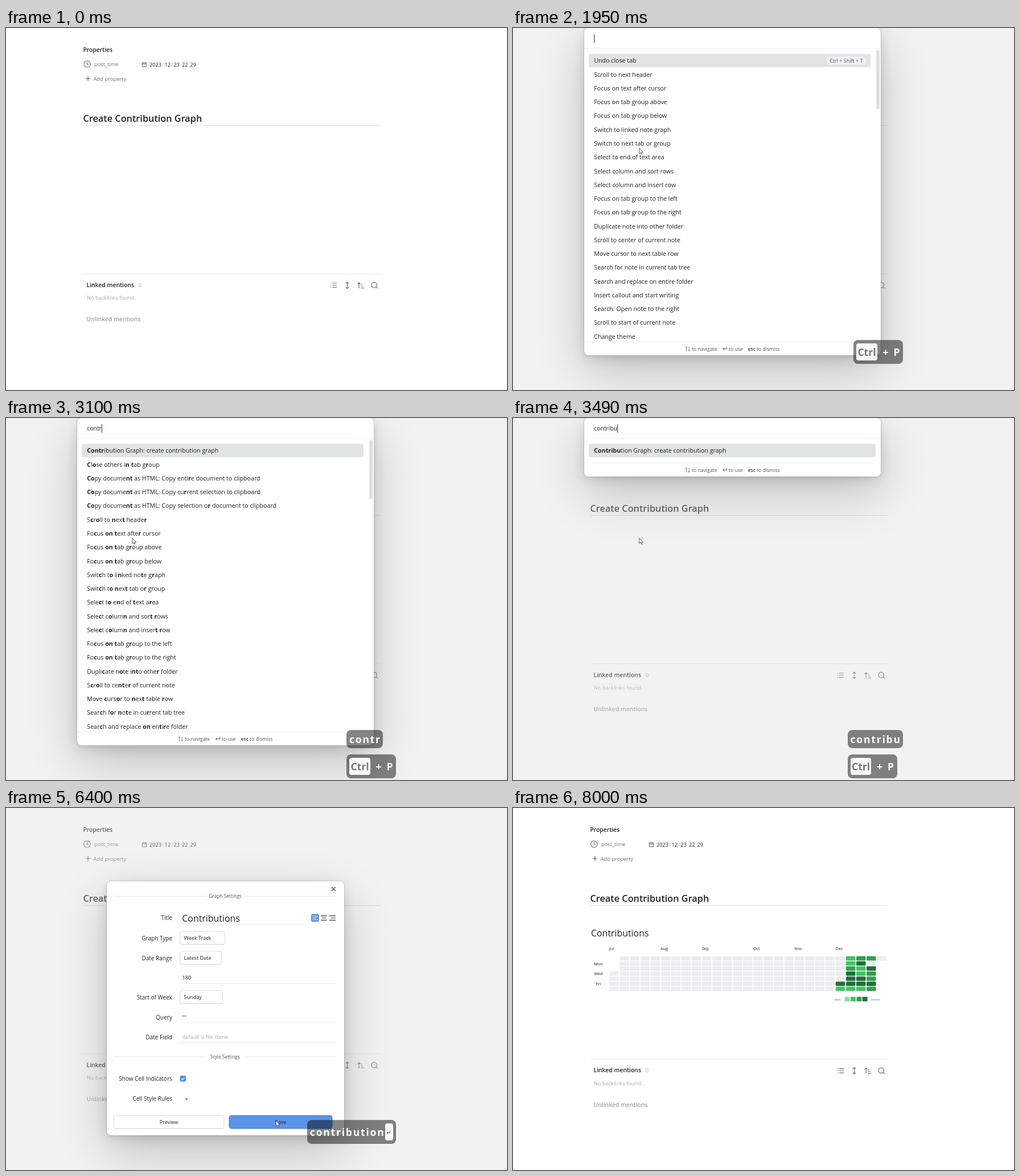
Animation of 880x637 px, one loop 8.15 s. Source, as an HTML page:

```html
<!DOCTYPE html>
<html lang="en">
<head>
<meta charset="utf-8">
<title>Create Contribution Graph</title>
<style>
html, body { margin: 0; width: 100%; height: 100%; overflow: hidden; background: #fff; }
body { position: relative; font-family: "Open Sans", "Noto Sans", sans-serif; }
svg, #cover { position: absolute; left: 0; top: 0; width: 880px; height: 637px; }
#cover { background: rgba(220, 220, 220, .36); }
#box {
  position: absolute; box-sizing: border-box; background: #fff; border-radius: 8px;
  box-shadow: 0 0 0 1px rgba(0, 0, 0, .1), 0 2px 7px rgba(0, 0, 0, .07),
    0 6px 25px rgba(0, 0, 0, .11), 0 30px 85px rgba(0, 0, 0, .2);
}
#keys {
  position: absolute; right: 195px; top: 549px; display: flex; flex-direction: column;
  align-items: flex-start; gap: 11px; font-weight: 700; font-size: 17.5px; color: #fff;
}
.pill {
  display: flex; align-items: center; height: 32px; padding: 0 3.3px 0 4.5px;
  border-radius: 8px; background: rgba(0, 0, 0, .48); white-space: pre;
}
.pill.tall { height: 42px; padding: 0 5.5px 0 5px; }
.typed { letter-spacing: 1.8px; }
.key { height: 30px; line-height: 30px; padding: 0 2px; border-radius: 4px; background: #fafafa; color: #777; }
.plus { margin: 0 9px 0 10px; }
.enter { font: 10px/34px "DejaVu Sans", sans-serif; color: #444; width: 14px; padding: 0; text-align: center; }
</style>
</head>
<body>
<svg id="page"></svg>
<div id="cover"></div>
<div id="box"></div>
<svg id="dialog"></svg>
<div id="keys"></div>
<svg id="pointer"></svg>
<script>
const LOOP = 8150, STEP = 78.5;
const T = { press: 1000, release: 1080, palette: 1860, settings: 4820, click: 6320, clicked: 6400, saved: 6580 };
const INK = '#222', MUTED = '#6b7575', FAINT = '#a3adad', BLUE = '#5a8fdd', ROW = 24.27;
const $ = id => document.getElementById(id);
const between = (t, a, b) => t >= a && t < b;

const ruler = document.createElement('canvas').getContext('2d');
function measure(str, size) {
  ruler.font = `${size}px "Open Sans", "Noto Sans", sans-serif`;
  return ruler.measureText(str).width;
}

// SVG helpers; text is placed by the middle of its capitals.
const text = (x, y, str, size, fill = INK, weight = 400, anchor = 'start') =>
  `<text x="${x}" y="${y + size * .36}" font-size="${size}" fill="${fill}" font-weight="${weight}" text-anchor="${anchor}">${str}</text>`;
const path = (d, stroke = '#666', width = 1.1, fill = 'none') =>
  `<path d="${d}" stroke="${stroke}" stroke-width="${width}" fill="${fill}"/>`;
const rect = (x, y, w, h, fill, r = 0, stroke = 'none') =>
  `<rect x="${x}" y="${y}" width="${w}" height="${h}" rx="${r}" fill="${fill}" stroke="${stroke}"/>`;
const rule = (x1, x2, y, color = '#e6e6e6') => path(`M${x1} ${y}H${x2}`, color, 1);
const circle = (x, y, r) => `<circle cx="${x}" cy="${y}" r="${r}" fill="none" stroke="#666" stroke-width="1.1"/>`;
const caret = (x, y) => rect(x, y, 1, 15, '#222');

function properties() {
  const date = [[252, '2023'], [274.6, '/'], [278.8, '12'], [290.2, '/'], [294.6, '23'], [309, '22'], [320.3, ':'], [323.6, '29']];
  return text(135.5, 38, 'Properties', 10.3, INK, 600)
    + circle(142.5, 63.5, 5.8) + path('M142.5 60V63.8L145 65')
    + text(155, 64, 'post_time', 9.25, MUTED)
    + path('M239.3 61.3H246.7V68.2H239.3ZM239.3 63.2H246.7M241 60V61.5M245 60V61.5', '#666', 1)
    + date.map(([x, s]) => text(x, 64.5, s, 9.2, /\d/.test(s) ? INK : FAINT)).join('')
    + path('M139.7 89H148.3M144 84.7V93.3', '#555')
    + text(153.5, 89.5, 'Add property', 9.4, MUTED)
    + text(135.5, 159.3, 'Create Contribution Graph', 16.3, INK, 600)
    + rule(135.5, 658, 171.5, '#dedede');
}

function mentions(shift) {
  return `<g transform="translate(0 ${shift})">` + rule(135.5, 658, 432.5, '#ececec')
    + text(141.5, 452, 'Linked mentions', 10.4, INK, 600) + text(233, 452.5, '0', 9, FAINT)
    + path('M573 449H581M573 452.7H581M573 456.5H581M570 449H571M570 452.7H571M570 456.5H571')
    + path('M599.5 447V458.5M596.8 449.7L599.5 447L602.2 449.7M596.8 455.8L599.5 458.5L602.2 455.8')
    + path('M620 458V448M617.5 450.5L620 448L622.5 450.5M623.5 451H625.5M623.5 454.3H627M623.5 457.5H629')
    + circle(646.7, 452.2, 4.8) + path('M650.2 455.7L653 458.3')
    + text(142, 475, 'No backlinks found.', 9.3, FAINT)
    + text(141.5, 512.5, 'Unlinked mentions', 10.4, '#9aa3a3', 600) + '</g>';
}

function graph() {
  const colors = ['#ebedf0', '#9bd8a5', '#40c463', '#30a14e', '#216e39'];
  const levels = { 22: '0000042', 23: '2234442', 24: '3422442', 25: '3043343' };
  const months = { Jul: 0, Aug: 5, Sep: 9, Oct: 14, Nov: 18, Dec: 22 };
  const days = { Mon: 1, Wed: 3, Fri: 5 };
  let out = text(137, 220.5, 'Contributions', 15.9);
  for (const m in months) out += text(169 + months[m] * 18.07, 247, m, 7.2);
  for (const d in days) out += text(150, 265.5 + days[d] * 8.75, d, 7.3, INK, 400, 'middle');
  for (let c = 0; c < 27; c++)
    for (let r = c ? 0 : 3; r < (c < 26 ? 7 : 1); r++)
      out += rect(169.2 + c * 18.07, 260.7 + r * 8.95, 16.6, 7.7, colors[levels[c]?.[r] ?? 0], 1.5);
  out += text(565, 336.7, 'less', 6, MUTED) + text(629, 336.7, 'more', 6, MUTED);
  for (let i = 1; i < 5; i++) out += rect(572.3 + i * 10.35, 332.3, 9, 8, colors[i], 1.2);
  return out;
}

// Each command is "name|hotkey".
const commands = `Change theme
Close window|Ctrl + Shift + W
Copy file path
Create new note
Close current tab|Ctrl + W
Copy Quillorn URL
Close all other tabs
Close this tab group
Clear file properties
Cycle bullet/checkbox
CustomJS: Invoke Script
Create note to the right
Canvas: Create new canvas
Close others in tab group
Create new note in current tab
Command palette: Open command palette|Ctrl + P
Contribution Graph: create contribution graph
Copy document as HTML: Copy entire document to clipboard
Copy document as HTML: Copy current selection to clipboard
Copy document as HTML: Copy selection or document to clipboard
Undo close tab|Ctrl + Shift + T
Scroll to next header
Focus on text after cursor
Focus on tab group above
Focus on tab group below
Switch to linked note graph
Switch to next tab or group
Select to end of text area
Select column and sort rows
Select column and insert row
Focus on tab group to the left
Focus on tab group to the right
Duplicate note into other folder
Scroll to center of current note
Move cursor to next table row
Search for note in current tab tree
Search and replace on entire folder
Insert callout and start writing
Search: Open note to the right
Scroll to start of current note`.split('\n').map(line => line.split('|'));
const startCommands = [...commands.slice(20), ...commands.slice(0, 20)];

// Marks the letters of the query in the name, or returns null if they do not all occur in order.
function fuzzy(name, query) {
  let n = 0;
  const marked = [...name].map(ch =>
    n < query.length && ch.toLowerCase() === query[n] ? (n++, `<tspan font-weight="700">${ch}</tspan>`) : ch).join('');
  return n === query.length ? marked : null;
}

function search(query) {
  if (!query) return startCommands;
  const isPrefix = ([name]) => name.toLowerCase().startsWith(query);
  const hits = commands.filter(([name]) => fuzzy(name, query));
  return [...hits.filter(isPrefix), ...hits.filter(c => !isPrefix(c))];
}

function palette(query, caretOn) {
  const hits = search(query), full = hits.length > 20;
  const foot = full ? 552.5 : 55 + hits.length * ROW;
  const height = foot + 23.8, y = foot + 12.2;
  let out = text(142.3, 18.7, query, 10.4) + rule(125, 645, 36.5, '#f0f0f0')
    + rect(133, 45.5, full ? 495 : 504, 23.5, '#e0e4e7', 3);
  if (full) out += rect(638.3, 39, 5.6, 104, '#dedede', 2);
  hits.slice(0, 21).forEach(([name, hotkey], i) => {
    const rowY = 57.5 + i * ROW;
    out += text(142.3, rowY, fuzzy(name, query), 10.67);
    if (!hotkey) return;
    const w = measure(hotkey, 9) + 9;
    out += rect(619 - w, rowY - 7, w, 14, '#f2f3f4', 3) + text(614.5, rowY, hotkey, 9, '#555', 400, 'end');
  });
  out += rule(125, 645, foot, '#f0f0f0')
    + path(`M304.5 ${y + 4}v-8m-1.7 1.8l1.7 -1.8l1.7 1.8M309.3 ${y - 4}v8m-1.7 -1.8l1.7 1.8l1.7 -1.8`, '#666', .8)
    + text(314, y, 'to navigate', 8.6, '#555')
    + path(`M375.5 ${y - 3.5}v3.5h-7m2.3 -2.3l-2.3 2.3l2.3 2.3`, '#555', 1)
    + text(379, y, 'to use', 8.6, '#555') + text(412.5, y, 'esc', 8.6, '#444', 600) + text(428, y, 'to dismiss', 8.6, '#555');
  if (caretOn) out += caret(142.3 + measure(query, 10.4), 11);
  return { box: [124.5, 0, 521.5, height], out };
}

function button(x, y, w, label, hover, centered) {
  return rect(x, y + 1, w, 23, '#e4e4e4', 4) + rect(x, y, w, 23, hover ? '#5b94e8' : '#fff', 4, hover ? '#4a80d0' : '#dcdcdc')
    + (centered ? text(x + w / 2, y + 12, label, 9, INK, 400, 'middle') : text(x + 7, y + 12, label, 9.1));
}

function section(y, title) {
  return rule(189, 350, y) + rule(419.5, 581, y) + text(385, y, title, 8.4, '#555', 400, 'middle');
}

function settings(hover) {
  const labels = [['Title', 193.5], ['Graph Type', 229], ['Date Range', 264], ['Start of Week', 333], ['Query', 368],
    ['Date Field', 403], ['Show Cell Indicators', 476.8], ['Cell Style Rules', 511.7]];
  const out = path('M572 139L579 146M579 139L572 146', '#444')
    + section(155.3, 'Graph Settings') + section(437.8, 'Style Settings')
    + labels.map(([s, y]) => text(292, y, s, 10, INK, 400, 'end')).join('')
    + text(309.3, 194, 'Contributions', 15.9) + rule(306, 525, 204.5, '#ececec')
    + rect(536, 186.5, 13.8, 13.8, BLUE, 3) + path('M538 190.2H548M538 193.5H546M538 196.8H548', '#fff')
    + path('M553 189.7H563.5M555 193.5H561.5M553 197.3H563.5M568 189.7H579M571 193.5H579M568 197.3H579', '#333', 1.2)
    + button(305.5, 217, 79, 'Week Track') + button(305.5, 252, 73.5, 'Latest Date') + button(305.5, 321, 75, 'Sunday')
    + text(309.5, 298.5, '180', 9.2) + text(309.5, 368.5, '""', 9.2) + text(309.5, 403, 'default is file.ctime', 9.15, '#aaa')
    + [308.5, 378, 413].map(y => rule(306, 580, y, '#ececec')).join('')
    + rect(305.5, 471, 10.5, 10.5, BLUE, 2.5) + path('M308 476.3L310 478.4L313.6 474.3', '#fff', 1.2)
    + path('M314.7 512.2H319.7M317.2 509.7V514.7', '#444', .9)
    + button(189, 541, 194, 'Preview', false, true) + button(392, 541, 181, 'Save', hover, true);
  return { box: [177, 128.5, 417, 447], out };
}

const typing = [...'contribution'].map((ch, i) =>
  [ch, [2710, 2790, 2870, 3020, 3100, 3260, 3410, 3490, 3730, 3810, 3960, 4040][i]]);
const typedAt = t => typing.filter(([, at]) => t >= at).map(([ch]) => ch).join('');

function keys(t) {
  const typed = t < 7990 ? typedAt(t) : '', entered = t >= T.settings;
  const enter = entered ? '<span class="key enter">↵</span>' : '';
  const typedFade = t < 7840 ? 1 : t < 7920 ? .66 : .33, comboFade = t < 4900 ? 1 : .5;
  let out = '';
  if (typed) out += `<div class="pill ${entered ? 'tall' : ''}" style="opacity:${typedFade}"><span class="typed">${typed}</span>${enter}</div>`;
  if (between(t, T.palette, 4990))
    out += `<div class="pill tall" style="opacity:${comboFade}"><span class="key">Ctrl</span><span class="plus">+</span>P</div>`;
  return out;
}

const moves = [
  { at: 210, steps: 11, from: [826, 640], to: [221.5, 211] },
  { at: 5460, steps: 10, from: [221.5, 211], to: [474, 550] },
  { at: 7040, steps: 6, from: [474, 550], to: [850, 645] }
];
function pointer(t) {
  const move = moves.filter(m => t >= m.at).pop();
  if (!move) return '';
  const p = Math.min(1, (Math.floor((t - move.at) / STEP) + 1) / move.steps);
  const e = p * p * (3 - 2 * p);
  const [x, y] = move.from.map((a, i) => a + (move.to[i] - a) * e);
  const beam = t < T.palette && x < 658 && y < 430;
  const ring = between(t, T.press, T.release) || between(t, T.click, T.clicked);
  return `<g transform="translate(${x} ${y})">`
    + (ring ? '<circle r="8" fill="#8883" stroke="#8888"/>' : '')
    + (beam ? path('M-1 -3.5H.5L1 -3L1.5 -3.5H3M1 -3V4.5M-1 5H.5L1 4.5L1.5 5H3', '#222', 1)
      : path('M.3 .3V10L2.5 8L4 11.2L5.5 10.5L4.1 7.4H7Z', '#333', .8, '#fff')) + '</g>';
}

const shown = {};
function show(id, html) {
  if (shown[id] !== html) $(id).innerHTML = shown[id] = html;
}

function render(t) {
  const saved = t >= T.saved;
  let page = properties() + mentions(saved ? 9.6 : 0) + (saved ? graph() : '');
  if (between(t, T.press, 1550)) page += caret(135.3, 206);
  if (between(t, T.saved, 7080) || between(t, 7600, 7990)) page += caret(135.3, 351);
  show('page', page);

  let dialog = null;
  if (between(t, T.palette, T.settings)) dialog = palette(typedAt(t), between(t, T.palette, 2400) || between(t, 2710, 4510));
  else if (between(t, T.settings, T.saved)) dialog = settings(t >= 6160);
  $('cover').hidden = $('box').hidden = !dialog;
  if (dialog) ['left', 'top', 'width', 'height'].forEach((side, i) => $('box').style[side] = dialog.box[i] + 'px');
  show('dialog', dialog ? dialog.out : '');
  show('keys', keys(t));
  show('pointer', pointer(t));
}

const start = performance.now();
function tick() {
  render((performance.now() - start) % LOOP);
  requestAnimationFrame(tick);
}
tick();
</script>
</body>
</html>
```
